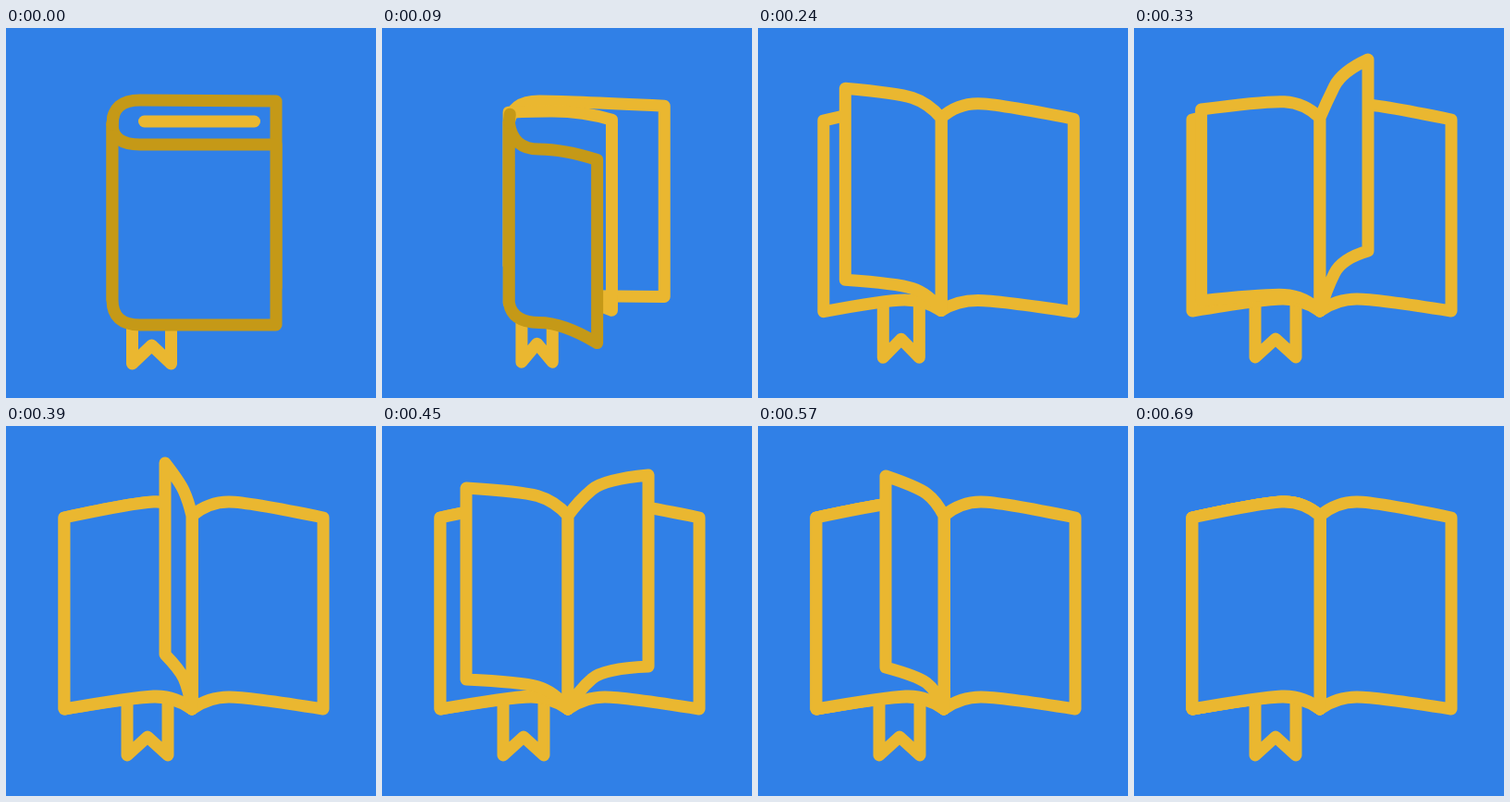
Write an HTML page with a canvas that moves like this. It is 400 px wide and 400 px high and loops after 720 ms.

```html
<!DOCTYPE html>
<html lang="en">
<head>
<meta charset="utf-8">
<title>Opening book</title>
<style>
html, body { margin: 0; width: 100%; height: 100%; overflow: hidden; background: #3080e7; }
canvas { display: block; width: 400px; height: 400px; }
</style>
</head>
<body>
<canvas id="stage" width="400" height="400"></canvas>
<script>
const ctx = document.getElementById('stage').getContext('2d');
const BLUE = '#3080e7', LIGHT = '#eab730', DARK = '#c59917';
const LOOP = 720, STEP = 30, OPEN_TIME = 270;

// Path of a turning page's outer corner: time, x, y.
const TURN = [
  [0, 343, 99], [60, 288, 53], [90, 253, 34], [150, 172, 40],
  [180, 138, 54], [210, 91, 67], [300, 63, 99]
];

const mix = (a, b, u) => a + (b - a) * u;
const smooth = u => u * u * (3 - 2 * u);

function turnCorner(s) {
  const next = TURN.findIndex(([time]) => time > s);
  if (next < 0) return { x: 63, y: 99 };
  const [t0, x0, y0] = TURN[next - 1], [t1, x1, y1] = TURN[next];
  const u = (s - t0) / (t1 - t0);
  return { x: mix(x0, x1, u), y: mix(y0, y1, u) };
}

// A leaf runs from its hinge through a bend and a middle point to its edge.
// Each h is the leaf's height there; the bend is as high as the middle.
function drawLeaf({ hinge, bend, mid, edge }, color, filled) {
  const lead = { x: mix(bend.x, mid.x, 1.9), y: mix(bend.y, mid.y, 1.9) };
  ctx.beginPath();
  ctx.moveTo(hinge.x, hinge.y);
  ctx.quadraticCurveTo(bend.x, bend.y, mid.x, mid.y);
  ctx.quadraticCurveTo(lead.x, lead.y, edge.x, edge.y);
  ctx.lineTo(edge.x, edge.y + edge.h);
  ctx.quadraticCurveTo(lead.x, lead.y + mid.h, mid.x, mid.y + mid.h);
  ctx.quadraticCurveTo(bend.x, bend.y + mid.h, hinge.x, hinge.y + hinge.h);
  ctx.closePath();
  if (filled) {
    ctx.fillStyle = BLUE;
    ctx.fill();
  }
  ctx.strokeStyle = color;
  ctx.stroke();
}

function drawLine(color, ...points) {
  ctx.beginPath();
  points.forEach(([x, y]) => ctx.lineTo(x, y));
  ctx.strokeStyle = color;
  ctx.stroke();
}

// The poses below depend on u, from 0 (closed) to 1 (open).
const spineAt = u => ({ x: mix(115, 201, u), y: mix(104, 97, u), h: mix(190, 209, u) });
const swingAt = u => 165 * u * (1 - u) ** 2;

function coverLeaf(u, edge, rise, midH) {
  const hinge = spineAt(u), dx = edge.x - hinge.x;
  const midX = Math.sign(dx) * Math.min(mix(30, 40, u), 0.6 * Math.abs(dx));
  const y = hinge.y + rise;
  return {
    hinge, edge,
    bend: { x: hinge.x + midX * 0.45 * u, y },
    mid: { x: hinge.x + midX, y, h: midH }
  };
}

function frontCover(u) {
  const swing = swingAt(u);
  const edge = { x: mix(292, 63, u), y: mix(126, 99, u) + swing, h: mix(195, 207, u) };
  return coverLeaf(u, edge, mix(22, -15, u) + 0.7 * swing, mix(195, 211, u) - swing / 2);
}

function backCover(u) {
  const h = mix(202, 207, u) + 60 * u * u * (1 - u);
  const edge = { x: mix(292, 343, u), y: mix(79, 99, u), h };
  return coverLeaf(u, edge, mix(-26, -15, u), h + 4);
}

function firstPage(u) {
  const lift = u ** 3;
  const x = spineAt(u).x + 3 - 185 * lift, y = mix(84, 112, u);
  const edge = { x: 269 - 178 * u ** 1.6, y: 101 - 100 * lift, h: 206 };
  return {
    edge,
    hinge: { x, y, h: 165 },
    bend: { x: mix(x, edge.x, 0.05), y: y - 52 * lift },
    mid: { x: mix(x, edge.x, 0.4), y: y - 76 * lift, h: 201 }
  };
}

function turningPage(hinge, s) {
  const corner = turnCorner(s);
  const dx = corner.x - 201, lift = 99 - corner.y;
  return {
    hinge,
    bend: { x: hinge.x + dx * 0.13, y: hinge.y - 16 },
    mid: {
      x: hinge.x + dx * 0.3,
      y: hinge.y - 15 - lift * (dx > 0 ? 0.29 : 0.2),
      h: 210 - lift * 0.12
    },
    edge: { x: hinge.x + dx, y: corner.y, h: 207 }
  };
}

function drawRibbon(u) {
  const center = mix(157.5, 153, u) + 15.5 * Math.sin(Math.PI * u);
  const half = 21 - 43 * u ** 1.7;
  const top = mix(322, 298, u), foot = mix(363, 356, u);
  const left = center - half, right = center + half;
  drawLine(LIGHT, [left, top], [left, foot], [center, foot - 20], [right, foot], [right, top]);
}

function draw(t) {
  const u = smooth(Math.min(1, t / OPEN_TIME));
  const closed = t === 0;
  const spine = spineAt(u), front = frontCover(u);
  const outside = front.edge.x > spine.x;

  ctx.fillStyle = BLUE;
  ctx.fillRect(0, 0, 400, 400);
  ctx.lineWidth = 13;
  ctx.lineJoin = ctx.lineCap = 'round';

  drawRibbon(u);
  drawLeaf(backCover(u), closed ? DARK : LIGHT);
  if (closed) drawLine(LIGHT, [149.5, 101], [268.5, 101]);
  else if (t <= 180) drawLeaf(firstPage(u), LIGHT);

  drawLeaf(front, outside ? DARK : LIGHT, outside);
  if (outside) drawLine(DARK, [spine.x, spine.y], [spine.x + 1, spine.y - 9]);

  const turns = [185 + (t - 210) * 0.7, t - 240, t - 390];
  if (t > 180) {
    turns.filter(s => s > 0).forEach(s => drawLeaf(turningPage(spine, s), LIGHT, true));
  }
}

const start = performance.now();
function tick() {
  const t = (performance.now() - start) % LOOP;
  draw(Math.floor(t / STEP) * STEP);
  requestAnimationFrame(tick);
}
tick();
</script>
</body>
</html>
```
